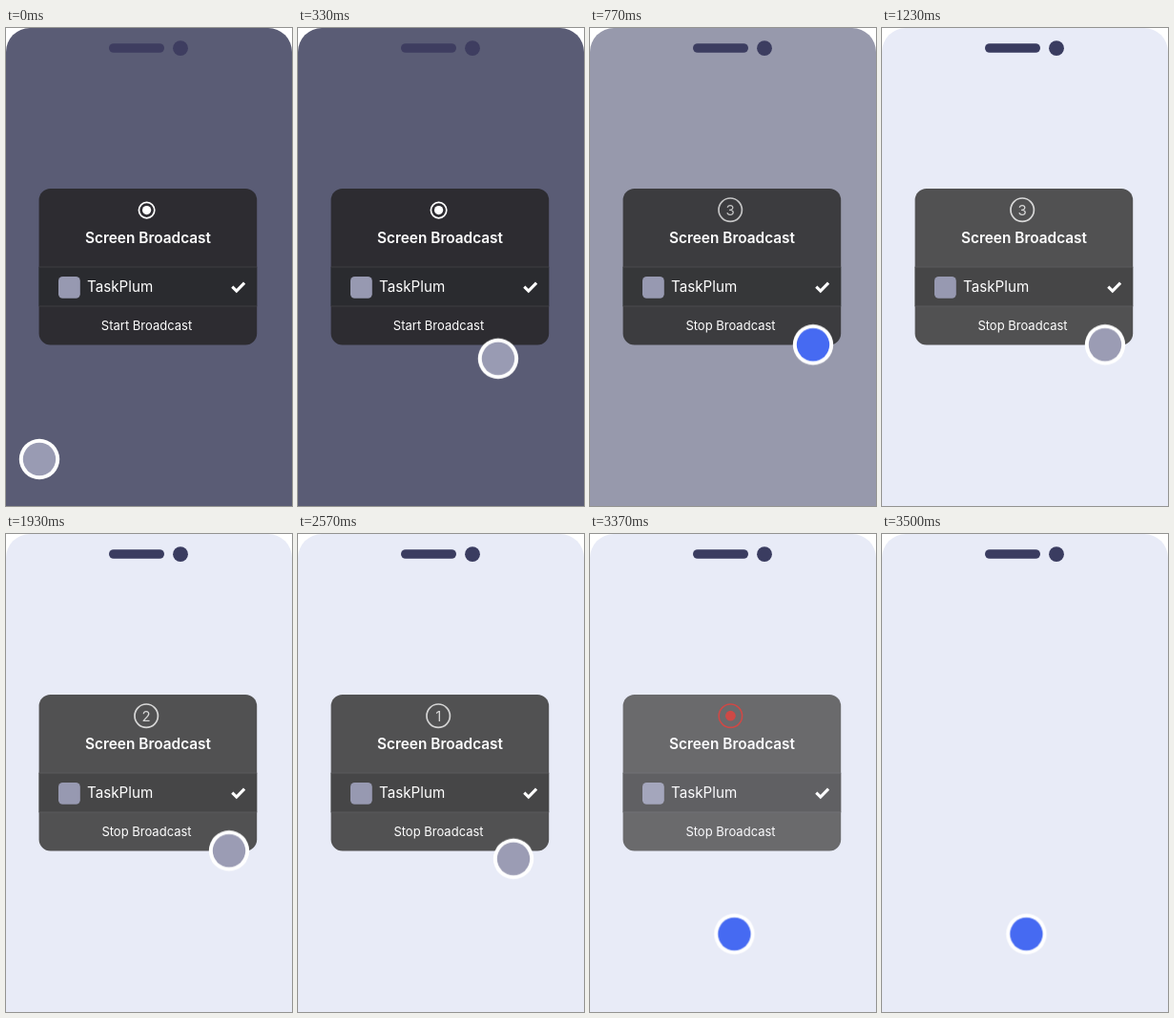
Write an HTML page that moves like this. It is 300x500 px and loops after 3.83 s.

```html
<!DOCTYPE html>
<html lang="en">
<head>
<meta charset="utf-8">
<title>Screen Broadcast</title>
<style>
  html, body { margin: 0; width: 100%; height: 100%; overflow: hidden; background: #fff; }
  svg { display: block; width: 100vw; height: 100vh; }
  text { font-family: Inter, "Open Sans", sans-serif; fill: #fff; }
  .mid { text-anchor: middle; }
  .title { font-size: 15.4px; font-weight: 600; }
  .name { font-size: 15.2px; }
  .action { font-size: 13px; }
  .count text { font-size: 15px; fill: #dedede; }
  .count circle { fill: none; stroke: #dedede; stroke-width: 1.7; }

  /* One shared 3830 ms clock; every percentage is ms / 38.3 */
  .anim { animation: 3.83s linear infinite both; }
  .screen { animation-name: screen; }
  .notch { animation-name: notch; }
  .dialog { animation-name: dialog; }
  .panel { animation-name: panel; }
  .row { animation-name: row; }
  .rule { animation-name: rule; }
  .cursor { animation-name: move; }
  .dot { animation-name: press; }
  .before { animation-name: before; }
  .after { animation-name: after; }
  .three { animation-name: three; }
  .two { animation-name: two; }
  .one { animation-name: one; }
  .live { animation-name: live; }

  @keyframes screen {
    0%, 17.89% { fill: #5a5c75; animation-timing-function: ease-out; }
    25.72%, 100% { fill: #e8ebf7; }
  }
  @keyframes notch {
    0%, 17.89% { fill: #3e3d60; animation-timing-function: ease-out; }
    25.72%, 100% { fill: #3a3c60; }
  }
  @keyframes panel {
    0%, 17.89% { fill: #2d2c31; animation-timing-function: ease-out; }
    25.72%, 100% { fill: #515152; }
  }
  @keyframes row {
    0%, 17.89% { fill: #2a2b2f; animation-timing-function: ease-out; }
    25.72%, 100% { fill: #464647; }
  }
  @keyframes rule {
    0%, 17.89% { fill: #3e3e43; animation-timing-function: ease-out; }
    25.72%, 100% { fill: #5b5b5c; }
  }
  @keyframes dialog {
    0%, 87.4% { opacity: 1; }
    91.3%, 100% { opacity: 0; }
  }
  @keyframes move {
    0%, 1.4% { transform: translate(35px, 451px); animation-timing-function: cubic-bezier(.3, .9, .65, 1); }
    14.88%, 66.7% { transform: translate(234px, 331.3px); animation-timing-function: cubic-bezier(.3, .95, .65, 1); }
    80.16%, 100% { transform: translate(151.4px, 418.4px); }
  }
  @keyframes press {
    0%, 15.2% { fill: #999bb3; }
    18%, 21.5% { fill: #466af2; }
    25.9%, 80.4% { fill: #9b9cb4; }
    83.5%, 100% { fill: #466af2; }
  }
  @keyframes before {
    0%, 15.4% { opacity: 1; }
    17.8%, 100% { opacity: 0; }
  }
  @keyframes after {
    0%, 15.4% { opacity: 0; }
    17.8%, 100% { opacity: 1; }
  }
  @keyframes three {
    0%, 17.6% { opacity: 0; }
    20.6%, 31.9% { opacity: 1; }
    38.3%, 100% { opacity: 0; }
  }
  @keyframes two {
    0%, 31.9% { opacity: 0; }
    38.3%, 50.2% { opacity: 1; }
    55.6%, 100% { opacity: 0; }
  }
  @keyframes one {
    0%, 50.2% { opacity: 0; }
    55.6%, 66.8% { opacity: 1; }
    71.5%, 100% { opacity: 0; }
  }
  @keyframes live {
    0%, 70% { opacity: 0; }
    76%, 100% { opacity: 1; }
  }
</style>
</head>
<body>
<svg viewBox="0 0 300 500" preserveAspectRatio="none">
  <path class="anim screen" d="M0 500V25A25 25 0 0 1 25 0H275A25 25 0 0 1 300 25V500Z"/>
  <g class="anim notch">
    <rect x="108" y="16.2" width="58" height="9.6" rx="4.8"/>
    <circle cx="183" cy="21.2" r="7.9"/>
  </g>

  <g class="anim dialog">
    <rect class="anim panel" x="34.6" y="168" width="228.6" height="163.6" rx="12"/>
    <rect class="anim row" x="34.6" y="250" width="228.6" height="41"/>
    <g class="anim rule">
      <rect x="34.6" y="249.5" width="228.6" height="1"/>
      <rect x="34.6" y="290.5" width="228.6" height="1"/>
    </g>

    <g class="anim before">
      <circle cx="147.6" cy="190.6" r="8.2" fill="none" stroke="#fff" stroke-width="1.7"/>
      <circle cx="147.6" cy="190.6" r="4.6" fill="#fff"/>
    </g>
    <g class="anim count three">
      <circle cx="147.2" cy="190.2" r="12.2"/>
      <text class="mid" x="147.2" y="195.6">3</text>
    </g>
    <g class="anim count two">
      <circle cx="147.2" cy="190.2" r="12.2"/>
      <text class="mid" x="147.2" y="195.6">2</text>
    </g>
    <g class="anim count one">
      <circle cx="147.2" cy="190.2" r="12.2"/>
      <text class="mid" x="147.2" y="195.6">1</text>
    </g>
    <g class="anim live">
      <circle cx="147.4" cy="190.2" r="12.2" fill="none" stroke="#c92a24" stroke-width="1.6"/>
      <circle cx="147.4" cy="190.2" r="5.4" fill="#c92a24"/>
    </g>

    <text class="mid title" x="149" y="225.4">Screen Broadcast</text>
    <rect x="55" y="260" width="22.8" height="22.8" rx="4.5" fill="#9799b1"/>
    <text class="name" x="85" y="276">TaskPlum</text>
    <path d="M237.3 270.6L241.8 275L250.1 266.6" fill="none" stroke="#fff" stroke-width="3.1"/>
    <text class="anim before mid action" x="147.5" y="315.6">Start Broadcast</text>
    <text class="anim after mid action" x="147.5" y="315.6">Stop Broadcast</text>
  </g>

  <g class="anim cursor">
    <circle r="21.2" fill="#fff"/>
    <circle class="anim dot" r="17.2"/>
  </g>
</svg>
</body>
</html>
```
